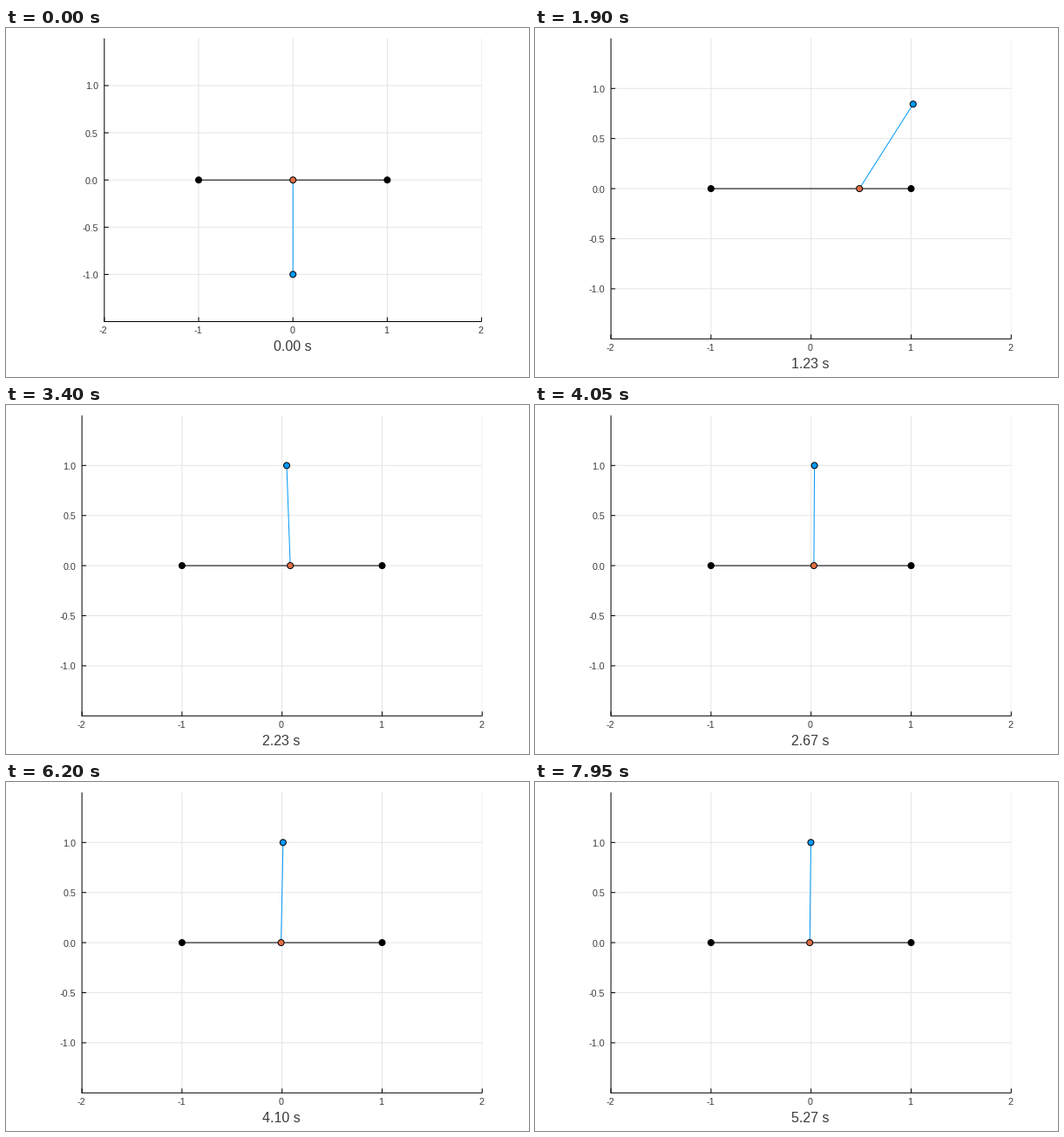
A matplotlib script that plays this animation: 600 by 400 pixels, repeating every 8000 ms.

```python
import numpy as np
import matplotlib.pyplot as plt
from matplotlib.animation import FuncAnimation
from matplotlib.patches import Circle

W, H, DPI = 600, 400, 100
FRAMES, INTERVAL = 160, 50
STEP = 1 / 30            # simulated seconds per frame
PX = 72 / DPI            # one pixel in points
GRAVITY, ROD = 9.81, 1.5  # uniform rod of unit length

BLUE, ORANGE, GRID, INK = "#009afa", "#e26f46", "#e5e5e5", "#3c3c3c"

# step: (cart position, pole angle measured from hanging down)
WAYPOINTS = {
    0: (0, 0),
    1: (0, 0),
    22: (0.915, -0.543),
    34: (0.525, 2.04),
    51: (0.008, np.pi - 0.22),
    55: (-0.064, np.pi - 0.225),
    81: (0.028, np.pi - 0.006),
    99: (0.065, np.pi + 0.049),
    124: (-0.010, np.pi - 0.020),
    159: (-0.013, np.pi - 0.011),
}
REACH_STEP, REACH = 31, 1.655   # furthest right the tip swings


def swing_up():
    """Least-effort cart and pole motion through the waypoints."""
    n = FRAMES
    eye = np.eye(n)
    inner = eye[1:-1]
    accel = (eye[2:] - 2 * inner + eye[:-2]) / STEP**2
    jerk = np.diff(accel, axis=0)
    steps = list(WAYPOINTS)
    goal = np.array(list(WAYPOINTS.values()), dtype=float)
    pins = eye[steps]
    w_dyn, w_eff, w_pin, w_reach = 4, 0.3, 3e4, 3e3

    def residual(z):
        x, th = z[:n], z[n:]
        c, a = th[1:-1], accel @ x
        dyn = accel @ th + ROD * (GRAVITY * np.sin(c) + a * np.cos(c))
        reach = x[REACH_STEP] + np.sin(th[REACH_STEP]) - REACH
        return np.concatenate([
            w_dyn * dyn, w_eff * a, w_eff * (jerk @ x),
            w_pin * (pins @ x - goal[:, 0]),
            w_pin * (pins @ th - goal[:, 1]),
            [w_reach * reach]])

    def jacobian(z):
        x, th = z[:n], z[n:]
        c, a = th[1:-1], accel @ x
        d_x = ROD * np.cos(c)[:, None] * accel
        slope = ROD * (GRAVITY * np.cos(c) - a * np.sin(c))
        d_th = accel + slope[:, None] * inner
        row = eye[REACH_STEP:REACH_STEP + 1]

        def wide(left, right):
            return np.hstack([left, right])

        return np.vstack([
            w_dyn * wide(d_x, d_th),
            w_eff * wide(accel, 0 * accel),
            w_eff * wide(jerk, 0 * jerk),
            w_pin * wide(pins, 0 * pins),
            w_pin * wide(0 * pins, pins),
            w_reach * wide(row, np.cos(th[REACH_STEP]) * row)])

    k = np.arange(n)
    z = np.concatenate([np.interp(k, steps, goal[:, i]) for i in (0, 1)])
    r, damp = residual(z), 100.0
    for _ in range(80):
        j = jacobian(z)
        trial = z - np.linalg.solve(j.T @ j + damp * np.eye(2 * n), j.T @ r)
        r_new = residual(trial)
        if r_new @ r_new < r @ r:
            z, r, damp = trial, r_new, max(damp / 5, 1e-3)
        else:
            damp *= 5
    return z[:n], z[n:]


class Layout:
    """Plot box in pixels with its grid, axes, rail and tick labels."""

    def __init__(self, ax, cx, cy, scale):
        self.cx, self.cy, self.scale = cx, cy, scale
        left, right = cx - 2 * scale, cx + 2 * scale
        top, bottom = cy - 1.5 * scale, cy + 1.5 * scale
        self.caption = (cx - 0.6, bottom + 33.5)
        self.parts = []

        def line(xs, ys, color="black", z=2, width=1):
            # unsnapped, so lines blend over fractional pixels
            self.parts += ax.plot(xs, ys, color=color, lw=width * PX, zorder=z,
                                  solid_capstyle="butt", snap=False)

        def label(x, y, s, ha):
            self.parts.append(ax.text(x, y, s, ha=ha, va="baseline",
                                      size=10.8 * PX, color=INK))

        for v in range(-2, 3):
            x, _ = self.to_px(v, 0)
            if -2 < v < 2:
                line([x, x], [top, bottom], GRID, 1)
            line([x, x], [bottom, bottom - 5])
            label(x - 1, bottom + 14, str(v), "center")
        # the grid line on the right edge is half cut off by the box
        line([right - 0.25] * 2, [top, bottom], GRID, 1, 0.5)
        for v in np.arange(-1, 1.1, 0.5):
            _, y = self.to_px(0, v)
            line([left, right], [y, y], GRID, 1)
            line([left, left + 5], [y, y])
            label(left - 7, y + 4.5, f"{v:.1f}", "right")
        line([left, left], [top, bottom + 0.5])
        line([left, right], [bottom, bottom])

        ends = [self.to_px(v, 0) for v in (-1, 1)]
        line(*zip(*ends), z=3)
        for p in ends:
            self.parts.append(ax.add_patch(dot(p, "black")))

    def to_px(self, x, y):
        return self.cx + x * self.scale, self.cy - y * self.scale

    def show(self, on):
        for part in self.parts:
            part.set_visible(on)


def dot(center, color, z=4):
    return Circle(center, 3.5, fc=color, ec="black", lw=PX, zorder=z,
                  snap=False)


plt.rcParams["font.family"] = "Liberation Sans"
fig = plt.figure(figsize=(W / DPI, H / DPI), dpi=DPI, facecolor="white")
ax = fig.add_axes([0, 0, 1, 1])
ax.set_xlim(0, W)
ax.set_ylim(H, 0)
ax.axis("off")

first = Layout(ax, 329.2, 174.2, 108.2)
rest = Layout(ax, 316.7, 184.1, 114.8)

pole, = ax.plot([], [], color=BLUE, lw=PX, zorder=5, snap=False)
cart = ax.add_patch(dot((0, 0), ORANGE, 6))
tip = ax.add_patch(dot((0, 0), BLUE, 6))
clock = ax.text(0, 0, "", ha="center", va="baseline", size=16 * PX, color=INK)

cart_x, angle = swing_up()


def draw(n):
    first.show(n == 0)
    rest.show(n > 0)
    box = rest if n else first
    x, th = cart_x[n], angle[n]
    a = box.to_px(x, 0)
    b = box.to_px(x + np.sin(th), -np.cos(th))
    pole.set_data(*zip(a, b))
    cart.center, tip.center = a, b
    clock.set_position(box.caption)
    clock.set_text(f"{max(n - 1, 0) * STEP:.2f} s")
    return pole, cart, tip, clock


anim = FuncAnimation(fig, draw, frames=FRAMES, interval=INTERVAL,
                     init_func=lambda: draw(0), repeat=True, blit=False)
plt.show()
```
